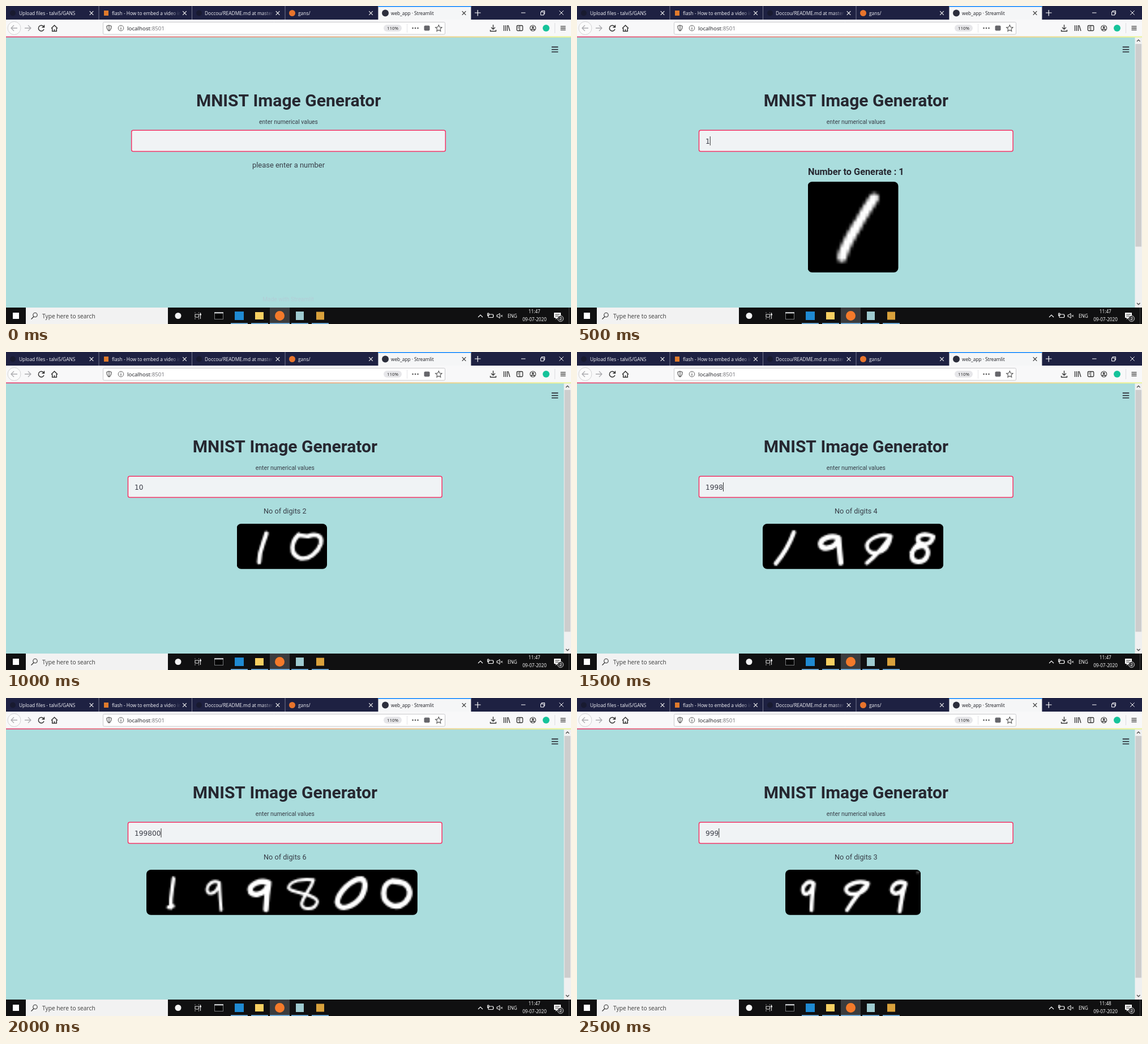
Recreate the animation shown at these times as an HTML page with a canvas. Size 998 by 561 pixels, loop 3000 ms.

```html
<!DOCTYPE html>
<html lang="en">
<head>
<meta charset="utf-8">
<title>MNIST Image Generator</title>
<style>
  html, body { margin: 0; width: 100%; height: 100%; overflow: hidden; background: #aadddd; }
  canvas { display: block; }
</style>
</head>
<body>
<canvas id="stage" width="998" height="561"></canvas>
<script>
const ctx = document.getElementById('stage').getContext('2d');
const UI = '"Open Sans", sans-serif';
const PAGE = 'Roboto, sans-serif';
const INK = '#262730';
const SOFT_INK = '#383d47';
const PINK = '#f63366';
const STEP = 500;

function rect(x, y, w, h, color) {
  ctx.fillStyle = color;
  ctx.fillRect(x, y, w, h);
}

function roundRect(x, y, w, h, r, fill, stroke, width = 1) {
  ctx.beginPath();
  ctx.roundRect(x, y, w, h, r);
  if (fill) { ctx.fillStyle = fill; ctx.fill(); }
  if (stroke) { ctx.strokeStyle = stroke; ctx.lineWidth = width; ctx.stroke(); }
}

const disc = (x, y, r, fill, stroke, width) =>
  roundRect(x - r, y - r, 2 * r, 2 * r, r, fill, stroke, width);

function line(path, color, width = 1.2) {
  ctx.strokeStyle = color;
  ctx.lineWidth = width;
  ctx.stroke(new Path2D(path));
}

// Draws a string and returns its width.
function text(str, x, y, size, color, family = UI, align = 'left', weight = 400) {
  ctx.font = `${weight} ${size}px ${family}`;
  ctx.textAlign = align;
  ctx.fillStyle = color;
  ctx.fillText(str, x, y);
  return ctx.measureText(str).width;
}

const cross = (x, y, r, color, width) =>
  line(`M${x - r} ${y - r}l${2 * r} ${2 * r}m0 ${-2 * r}l${-2 * r} ${2 * r}`, color, width);

const bars = (x, y, w, gap, color, width) =>
  line([-gap, 0, gap].map(d => `M${x - w / 2} ${y + d}h${w}`).join(''), color, width);

// Handwritten nine: loop between l..r and t..b, tail ending at x, y.
function nine(l, r, t, b, x, y) {
  const side = (t + b) / 2 + 3;
  return `M${r} ${t + 3}C${(l + r) / 2} ${t - 4} ${l} ${(t + side) / 2} ${l} ${side}` +
    `C${l} ${b + 4} ${r - 6} ${b + 3} ${r} ${t + 4}Q${(r + x) / 2 - 1} ${b} ${x} ${y}`;
}

// Each stroke is [path in stage coordinates, pen width].
const scenes = [
  { value: '', note: 'please enter a number' },
  {
    value: '1', caret: true, heading: 'Number to Generate : 1', x: 407.5, y: 310, cell: 160,
    strokes: [['M525 338Q511 359 496 385Q472 424 468 443', 16.5]],
  },
  {
    value: '10', note: 'No of digits 2', x: 407.5,
    strokes: [
      ['M460 320C455 338 447 348 447 371', 7.5],
      ['M516 323L533 325C545 320 560 322 556 338C551 354 535 366 521 364C499 358 504 334 517 322', 7.5],
    ],
  },
  {
    value: '1998', caret: true, note: 'No of digits 4', x: 328,
    strokes: [
      ['M383 318C373 346 364 358 351 373', 7.5],
      [nine(430, 462, 325, 346, 466, 372), 9.5],
      [nine(512, 554, 322, 357, 512, 372), 7],
      ['M629 326C616 319 600 322 602 332C605 341 624 343 629 327', 8],
      ['M604 338C586 352 589 369 602 370C617 371 624 354 617 346C613 340 596 343 591 354', 8],
    ],
  },
  {
    value: '199800', caret: true, note: 'No of digits 6', x: 248,
    strokes: [
      ['M296 318C293 342 290 350 291 370M287 369L295 367', 6.5],
      [nine(355, 377, 323, 345, 380, 374), 5.5],
      [nine(431, 464, 323, 347, 459, 373), 9.5],
      ['M543 321C526 318 500 322 499 335C505 345 548 345 550 359C546 375 522 375 522 363C525 348 540 335 543 321', 5.5],
      ['M628 319C610 318 586 345 585 360C588 378 615 368 628 350C638 330 634 322 628 319Z', 9.5],
      ['M682 323C662 329 662 360 682 366C700 371 715 355 713 341C710 326 697 324 682 323Z', 9.5],
    ],
  },
  {
    value: '999', caret: true, note: 'No of digits 3', x: 368, time: '11:48',
    strokes: [
      [nine(399, 418, 324, 346, 414, 374), 7],
      [nine(475, 514, 324, 346, 477, 374), 7],
      [nine(556, 580, 324, 345, 570, 376), 7.5],
      ['M600 308h4', 1],
    ],
  },
];

// Digits are rasterised at 28 px per cell and smoothly enlarged.
function makeSheet({ value, x, y = 303, cell = 79.8, strokes }) {
  const sheet = document.createElement('canvas');
  sheet.width = 28 * value.length;
  sheet.height = 28;
  const pen = sheet.getContext('2d');
  pen.fillRect(0, 0, sheet.width, 28);
  pen.scale(28 / cell, 28 / cell);
  pen.translate(-x, -y);
  pen.strokeStyle = '#fff';
  pen.lineJoin = 'round';
  pen.lineCap = 'round';
  for (const [path, width] of strokes) {
    pen.lineWidth = width;
    pen.stroke(new Path2D(path));
  }
  return sheet;
}

for (const scene of scenes) if (scene.strokes) scene.sheet = makeSheet(scene);

function drawDigits({ value, sheet, x, y = 303, cell = 79.8 }) {
  ctx.save();
  ctx.beginPath();
  ctx.roundRect(x, y, cell * value.length, cell, 8);
  ctx.clip();
  ctx.drawImage(sheet, x, y, cell * value.length, cell);
  ctx.restore();
}

function tabTitle(str, x, end) {
  const fade = ctx.createLinearGradient(end - 20, 0, end, 0);
  fade.addColorStop(0, '#f4f4f8');
  fade.addColorStop(1, 'rgba(244,244,248,0)');
  text(str, x, 15.6, 8.4, fade);
}

function drawTabs() {
  rect(0, 0, 998, 24, '#1e2142');
  [164, 328.5, 493].forEach(x => rect(x - 0.5, 0, 1, 24, '#777a90'));
  rect(657.4, 0, 164, 24, '#f5f6f7');
  rect(657.4, 0, 164, 1.5, '#0a84ff');

  disc(12, 12.5, 5, '#181a30');
  rect(173, 8, 8, 9, '#e07a2c');
  disc(341, 12.5, 5, '#181a30');
  disc(505.5, 12.5, 5.5, '#e8742c');
  disc(670, 12.5, 6, '#2c2e3c');

  tabTitle('Upload files - talvi5/GANS', 23, 144);
  tabTitle('flash - How to embed a video in', 187, 309);
  tabTitle('Doccou/README.md at master', 351, 473);
  tabTitle('gans/', 516, 637);
  text('web_app · Streamlit', 680, 15.6, 8.25, '#18191f');

  [151, 315.5, 480, 644.5].forEach(x => cross(x, 12.5, 3.3, '#eee', 1.2));
  cross(809, 12.5, 3.3, '#333', 1.2);
  line('M828 12h10.5M833.2 7v10.5M910 12h7.5', '#fff', 1.2);
  line('M944.5 10.5h5.5v5.5h-5.5zM946 10.5v-2h5.5v5.5h-1.5', '#fff', 1);
  cross(981, 12, 3.7, '#fff', 1);
}

function drawToolbar() {
  rect(0, 24, 998, 29.5, '#f8f8f9');
  disc(14.5, 39, 11.5, '#fbfbfb', '#d2d2d4', 1);
  line('M20 39h-11m5-5l-5 5l5 5M33 39h11m-5-5l5 5l-5 5', '#aaaaae', 1.3);
  line('M66.5 36.5A5 5 0 1 0 67 41M67.5 33.5v4h-4', '#333', 1.5);
  line('M80 39.5l5.5-5.5l5.5 5.5M81.7 39v5.5h7.6v-5.5M85.5 44v-3', '#333', 1.5);

  roundRect(171.5, 28.5, 604, 21.5, 2, '#fff', '#c9c9cc', 1);
  line('M182 34l4 1.5c0 5-1 7-4 8.5c-3-1.5-4-3.5-4-8.5zM182 35v8', '#555', 1.2);
  disc(203, 39, 4.8, null, '#666', 1);
  line('M203 38v4M203 35.8v1', '#555', 1.1);
  const hostWidth = text('localhost', 214, 42.7, 9.8, '#18191f');
  text(':8501', 214 + hostWidth, 42.7, 9.8, '#707075');
  roundRect(667, 33, 32, 12, 6, '#e6e6e9');
  text('110%', 683, 42, 7.9, '#222', UI, 'center');
  rect(708, 31, 1, 16, '#e6e6e8');
  [718.5, 723, 727.5].forEach(x => disc(x, 39, 1.3, '#555'));
  roundRect(738.5, 34.5, 10, 9, 2, '#66666b');
  line('M764.3 33.5l1.7 3.7l4 .5l-3 2.8l.8 4l-3.5-2l-3.5 2l.8-4l-3-2.8l4-.5z', '#555', 1.1);

  line('M860.5 33v8m-3.5-3.3l3.5 3.5l3.5-3.5M855.5 42v2.5h10v-2.5', '#333', 1.3);
  line('M879.5 34v10M882.5 34v10M885.5 34v10M887 34l3 10', '#333', 1.3);
  roundRect(902.3, 34.5, 10.4, 9, 1.5, null, '#333', 1.3);
  line('M907.5 35v8M904 37h2M904 39h2', '#333', 1);
  disc(930.7, 39, 5, null, '#444', 1.2);
  disc(930.7, 37.3, 1.9, '#444');
  line('M927.5 42q3.2-3 6.4 0', '#444', 1.8);
  disc(954, 39, 6, '#15c39a');
  rect(969, 30, 1, 18, '#dddddf');
  bars(984, 39, 9, 3.2, '#333', 1.3);
}

function drawPage(scene) {
  rect(0, 53, 998, 479, '#aadddd');
  const strip = ctx.createLinearGradient(0, 0, 998, 0);
  strip.addColorStop(0, PINK);
  strip.addColorStop(1, '#fffd80');
  rect(0, 53.5, 998, 1.8, strip);
  bars(969.5, 76.7, 11.5, 4.3, INK, 1.6);

  const scrolls = scene.value !== '';
  const mid = scrolls ? 492.8 : 499;
  text('MNIST Image Generator', mid, 176.5, 30, INK, PAGE, 'center', 700);
  text('enter numerical values', mid, 208.3, 10.35, SOFT_INK, PAGE, 'center');
  roundRect(mid - 277.3, 219.3, 554.6, 37.2, 3, '#f0f3f5', PINK, 1.5);

  if (scene.note) {
    text(scene.note, mid, 285, scrolls ? 12.7 : 12.95, SOFT_INK, PAGE, 'center');
  }
  if (!scrolls) {
    text('Made with Streamlit', 498.5, 521, 10.2, '#b3cdd6', PAGE, 'center');
    return;
  }

  text(scene.value, 227, 242.6, 12.2, '#3a3c46', '"DejaVu Sans", sans-serif');
  if (scene.caret) rect(227 + 7.75 * scene.value.length, 230, 1, 16, '#333');
  if (scene.heading) text(scene.heading, mid, 298.2, 16.3, INK, PAGE, 'center', 600);
  drawDigits(scene);

  rect(985.5, 55.4, 12.5, 476.6, '#f0f0f0');
  rect(986.5, 67, 10.5, scene.heading ? 357.5 : 426.5, '#cdcdcd');
  line('M989 62.5l2.8-2.8l2.8 2.8M989 524l2.8 2.8l2.8-2.8', '#505050', 1.4);
}

function drawTaskbar(time) {
  rect(0, 532, 998, 29, '#101011');
  rect(12, 541, 11, 11, '#fff');
  rect(35, 532, 251, 29, '#f2f2f2');
  disc(51.5, 545, 3.7, null, '#333', 1.1);
  line('M49 548l-4.5 4.5', '#333', 1.2);
  text('Type here to search', 64, 550.6, 10.25, '#3c3c3c');

  disc(304, 546.5, 5.5, '#f4f4f4');
  line('M334 544h6.5v5h-6.5zM334 541.5v-1M340.5 541.5v-1M334 551v1.5M340.5 551v1.5M343.5 541v11', '#ddd', 1.1);
  rect(342, 543, 3, 2.5, '#ddd');
  rect(368, 540, 16, 13, '#77797b');
  rect(368, 540, 16, 2.5, '#c4c6c8');
  rect(369, 542.5, 14, 9.5, '#050505');

  rect(466, 532, 35, 29, '#3b3c3e');
  rect(404, 539, 16, 15, '#1f8ad2');
  rect(440, 540, 15, 13, '#f7cf62');
  disc(483.5, 546.5, 8.5, '#f47a2a');
  rect(512, 539, 14, 15, '#9fcbd0');
  rect(548, 539.5, 14, 14, '#d9a13c');
  for (const [x, w] of [[397, 30], [433, 30], [466, 35], [504, 30], [540, 30]]) {
    rect(x, 559.3, w, 1.7, '#76b9ed');
  }

  line('M834 549l4-4l4 4', '#fff', 1.1);
  line('M852 544h8.5v5.5h-8.5zM861 545.5v2.5M850.5 542v4.5h2.5v-4.5z', '#fff', 1);
  line('M867 545h2l3-2.7v8.6l-3-2.7h-2z', '#fff', 1);
  cross(875.5, 546.7, 1.7, '#fff', 1);
  text('ENG', 886, 549.7, 8.3, '#fff');
  text(time, 933.3, 542, 8.2, '#fff', UI, 'center');
  text('09-07-2020', 933.5, 555.8, 8.2, '#fff', UI, 'center');
  ctx.fillStyle = '#fff';
  ctx.fill(new Path2D('M968 541h12v9h-6l-3 3v-3h-3z'));
  line('M970 544h8M970 547h6', '#222', 1);
  disc(979.5, 551.5, 5.2, '#3a3a3c', '#ddd', 0.8);
  text('2', 979.5, 554.2, 7.4, '#fff', UI, 'center');
  rect(994, 532, 1, 29, '#444');
}

function draw(now) {
  const scene = scenes[Math.floor(now / STEP) % scenes.length];
  drawPage(scene);
  drawTabs();
  drawToolbar();
  drawTaskbar(scene.time || '11:47');
}

let start;
function tick(now) {
  start ??= now;
  draw(now - start);
  requestAnimationFrame(tick);
}
draw(0);
requestAnimationFrame(tick);
</script>
</body>
</html>
```
